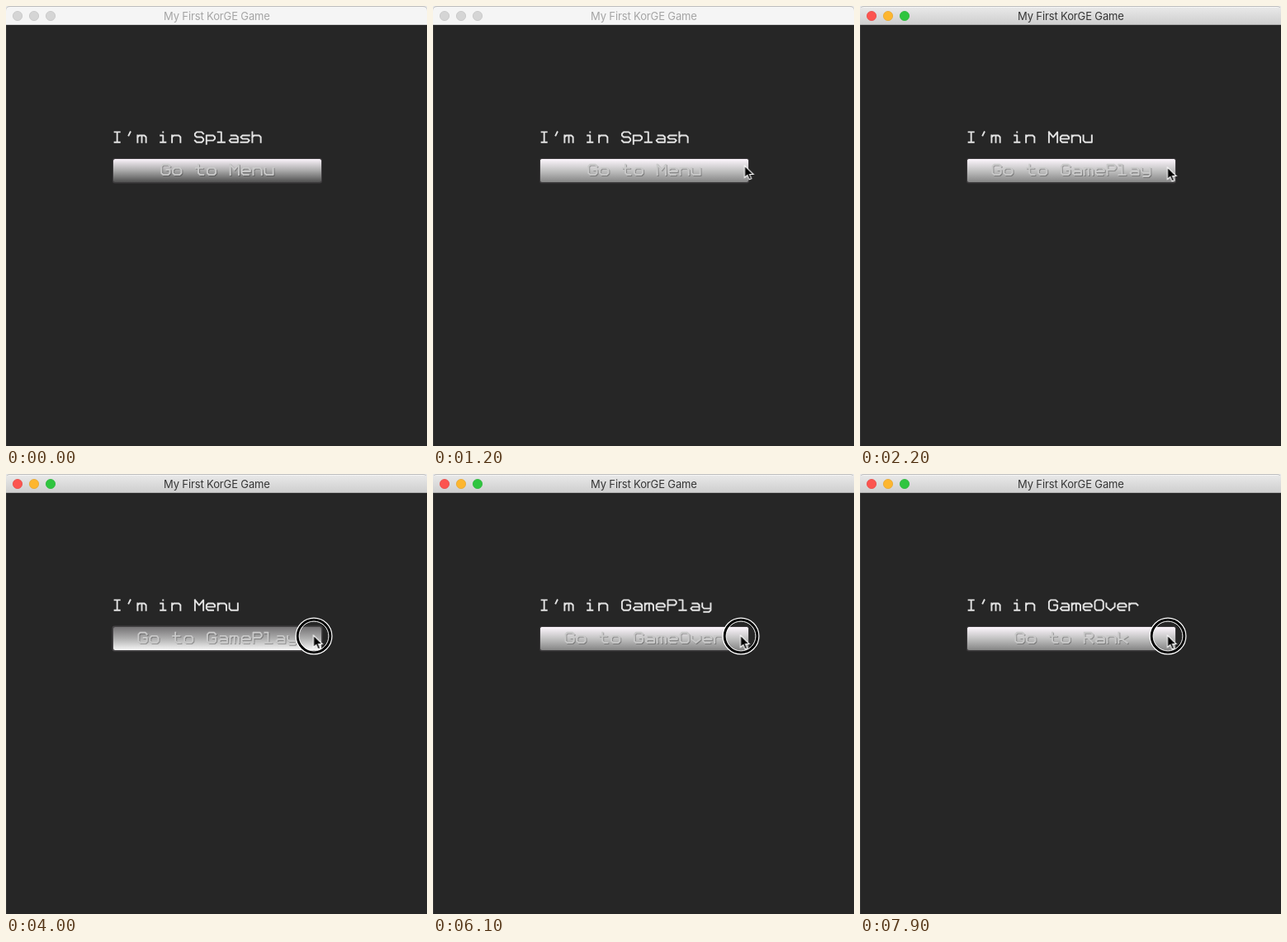
These frames come from a looping animation (510x532 px, 8000 ms). An HTML page:

```html
<!DOCTYPE html>
<html lang="en">
<head>
<meta charset="utf-8">
<title>My First KorGE Game</title>
<style>
html, body { margin: 0; width: 100%; height: 100%; overflow: hidden; background: #262626; }
svg { display: block; width: 510px; height: 532px; }
.title { font: 13px Inter, "Liberation Sans", sans-serif; letter-spacing: -.13px; text-anchor: middle; }
.ink { fill: none; stroke-width: .94; stroke-linecap: square; stroke-linejoin: round; }
.label { stroke: #e3e3e3; }
.shade { stroke: #000; stroke-opacity: .27; }
.face { stroke: #c9c9c9; }

.timed { animation: 8s step-end infinite; }
.active { animation-name: active; }
.hover { animation-name: hover; }
.down { animation-name: down; }
.ring { animation-name: ring; }
.cursor { animation-name: cursor; }
.splash { animation-name: splash; }
.menu { animation-name: menu; }
.play { animation-name: play; }
.over { animation-name: over; }

@keyframes active { 0% { opacity: 0 } 25%, 100% { opacity: 1 } }
@keyframes hover { 0% { opacity: 0 } 15%, 100% { opacity: 1 } }
@keyframes down {
  0%, 27.5%, 52.5%, 78.75%, 100% { opacity: 0 }
  26.25%, 50%, 77.5% { opacity: 1 }
}
@keyframes ring {
  0%, 27.5%, 52.5%, 80% { opacity: 0 }
  25%, 50%, 76.25%, 98.75%, 100% { opacity: 1 }
}
@keyframes splash { 0% { opacity: 1 } 27.5%, 100% { opacity: 0 } }
@keyframes menu { 0%, 52.5%, 100% { opacity: 0 } 27.5% { opacity: 1 } }
@keyframes play { 0%, 78.75%, 100% { opacity: 0 } 52.5% { opacity: 1 } }
@keyframes over { 0% { opacity: 0 } 78.75%, 100% { opacity: 1 } }
@keyframes cursor {
  0% { opacity: 0; transform: translate(462px, 122px) }
  10% { opacity: 1; transform: translate(462px, 122px) }
  11.25% { opacity: 1; transform: translate(438px, 143px) }
  12.5% { opacity: 1; transform: translate(411px, 166px) }
  13.75% { opacity: 1; transform: translate(389px, 183px) }
  15% { opacity: 1; transform: translate(377.5px, 193px) }
  16.25% { opacity: 1; transform: translate(374.5px, 194.5px) }
  17.5% { opacity: 1; transform: translate(373.5px, 195px) }
  21.25%, 100% { opacity: 1; transform: translate(372.5px, 195px) }
}
</style>
</head>
<body>
<svg viewBox="0 0 510 532">
  <defs>
    <linearGradient id="bar" x2="0" y2="1">
      <stop stop-color="#e8e8e8"/><stop offset="1" stop-color="#cfcfcf"/>
    </linearGradient>
    <linearGradient id="up" x2="0" y2="1">
      <stop stop-color="#faf3fa"/><stop offset=".5" stop-color="#aaa"/><stop offset="1" stop-color="#515151"/>
    </linearGradient>
    <linearGradient id="lit" x2="0" y2="1">
      <stop stop-color="#fdf6fd"/><stop offset=".5" stop-color="#c2c2c2"/><stop offset="1" stop-color="#858585"/>
    </linearGradient>
    <linearGradient id="press" x2="0" y2="1">
      <stop stop-color="#757375"/><stop offset=".5" stop-color="#afafaf"/><stop offset="1" stop-color="#f6f6f6"/>
    </linearGradient>
  </defs>

  <rect width="510" height="532" fill="#262626"/>
  <rect y="22" width="1" height="510" fill="#353535"/>

  <rect width="510" height="10" fill="#e9e9e9"/>
  <path d="M0 22V5Q0 0 5 0H505Q510 0 510 5V22Z" fill="#bdbdbd"/>
  <path d="M0 22V6Q0 1 5 1H505Q510 1 510 6V22Z" fill="#f5f5f5"/>
  <rect y="22" width="510" height="1" fill="#d2d2d2"/>
  <g fill="#d5d5d5" stroke="#c4c4c4" stroke-width=".8">
    <circle cx="14" cy="12" r="5.6"/><circle cx="34" cy="12" r="5.6"/><circle cx="54" cy="12" r="5.6"/>
  </g>
  <text class="title" x="255.4" y="17" fill="#a5a5a5">My First KorGE Game</text>

  <g class="timed active">
    <rect y="2" width="510" height="20" fill="url(#bar)"/>
    <rect y="22" width="510" height="1" fill="#adadad"/>
    <g stroke-width=".8">
      <circle cx="14" cy="12" r="5.6" fill="#fc544f" stroke="#e84a45"/>
      <circle cx="34" cy="12" r="5.6" fill="#fdb62f" stroke="#e8a62c"/>
      <circle cx="54" cy="12" r="5.6" fill="#2fc53f" stroke="#29b538"/>
    </g>
    <text class="title" x="255.4" y="17" fill="#363636">My First KorGE Game</text>
  </g>

  <rect x="129" y="184" width="254" height="30.5" rx="3" fill="#3c3a3c"/>
  <rect x="130" y="185" width="252" height="28" rx="2.5" fill="url(#up)"/>
  <rect class="timed hover" x="130" y="185" width="252" height="28" rx="2.5" fill="url(#lit)"/>
  <g class="timed down">
    <rect x="128.5" y="183.5" width="255" height="31" rx="3" fill="#444244"/>
    <rect x="130" y="185" width="252" height="28" rx="2.5" fill="url(#press)"/>
  </g>

  <g id="scenes"></g>

  <g class="timed ring" fill="none">
    <circle cx="373" cy="196" r="19.8" stroke="#000" stroke-width="3.8"/>
    <circle cx="373" cy="196" r="21.9" stroke="#fff" stroke-width="1.2"/>
    <circle cx="373" cy="196" r="17.9" stroke="#fff" stroke-width="1"/>
  </g>
  <path class="timed cursor" d="M0 0V14.6L3.3 11.5L5.6 16.8L8.2 15.7L6 10.5H10.6Z"
    fill="#000" stroke="#fff" stroke-width="1.1"/>
</svg>

<script>
const NS = 'http://www.w3.org/2000/svg';
const PITCH = 13.9, CELL = 2.05;

// Stroke letters on a six-column grid: capitals start at row 0, baseline is row 6.
const arm = 'M0 3L1 2H4L5 3';
const arch = arm + 'V6';
const bowl = 'M1 2H4L5 3V5L4 6H1L0 5V3Z';
const flag = 'M0 6V0H4L5 1V2L4 3H0';
const tall = 'M0 0V6', short = 'M0 2V6';
const letters = {
  I: 'M0 0H3M1.5 0V6M0 6H3',
  "'": 'M2.5 0L1.5 2',
  G: 'M5 1L4 0H1L0 1V5L1 6H4L5 5V3H3',
  M: tall + 'M0 0L2.5 3L5 0V6',
  O: 'M1 0H4L5 1V5L4 6H1L0 5V1Z',
  P: flag,
  R: flag + 'M2 3L5 6',
  S: 'M5 1L4 0H1L0 1V2L1 3H4L5 4V5L4 6H1L0 5',
  a: 'M1 2H4L5 3V6H1L0 5L1 4H5',
  e: 'M0 4H5V3L4 2H1L0 3V5L1 6H4',
  h: tall + arch,
  i: 'M1.5 0v.01M0 2H1.5V6M0 6H3',
  k: tall + 'M0 4H2L5 2M2 4L5 6',
  l: 'M0 0H2V6M0 6H4',
  m: short + arch + 'M2.5 2V6',
  n: short + arch,
  o: bowl,
  p: 'M0 7V2H4L5 3V4L4 5H0',
  r: short + arm,
  s: 'M5 2H1L0 3L1 4H4L5 5L4 6H0',
  t: 'M1.5 0V5L2.5 6H4.5M0 2H4',
  u: 'M0 2V5L1 6H5V2',
  v: 'M0 2V4L2.5 6L5 4V2',
  y: 'M0 2V4L1 5H5M5 2V6L4 7H1'
};

function add(parent, name, attrs) {
  const el = document.createElementNS(NS, name);
  for (const key in attrs) el.setAttribute(key, attrs[key]);
  return parent.appendChild(el);
}

function write(parent, text, x, y, style) {
  const line = add(parent, 'g', { class: 'ink ' + style, role: 'img', 'aria-label': text });
  [...text].forEach((ch, i) => {
    if (!letters[ch]) return;
    const left = x + i * PITCH + 1.6;
    add(line, 'path', { d: letters[ch], transform: `translate(${left} ${y}) scale(${CELL})` });
  });
}

function scene(id, name, next) {
  const group = add(document.getElementById('scenes'), 'g', { class: 'timed ' + id });
  const caption = 'Go to ' + next;
  const x = 256.2 - caption.length * PITCH / 2;
  write(group, "I'm in " + name, 130, 152.4, 'label');
  write(group, caption, x + 1, 192.8, 'shade');
  write(group, caption, x, 191.8, 'face');
}

scene('splash', 'Splash', 'Menu');
scene('menu', 'Menu', 'GamePlay');
scene('play', 'GamePlay', 'GameOver');
scene('over', 'GameOver', 'Rank');
</script>
</body>
</html>
```
